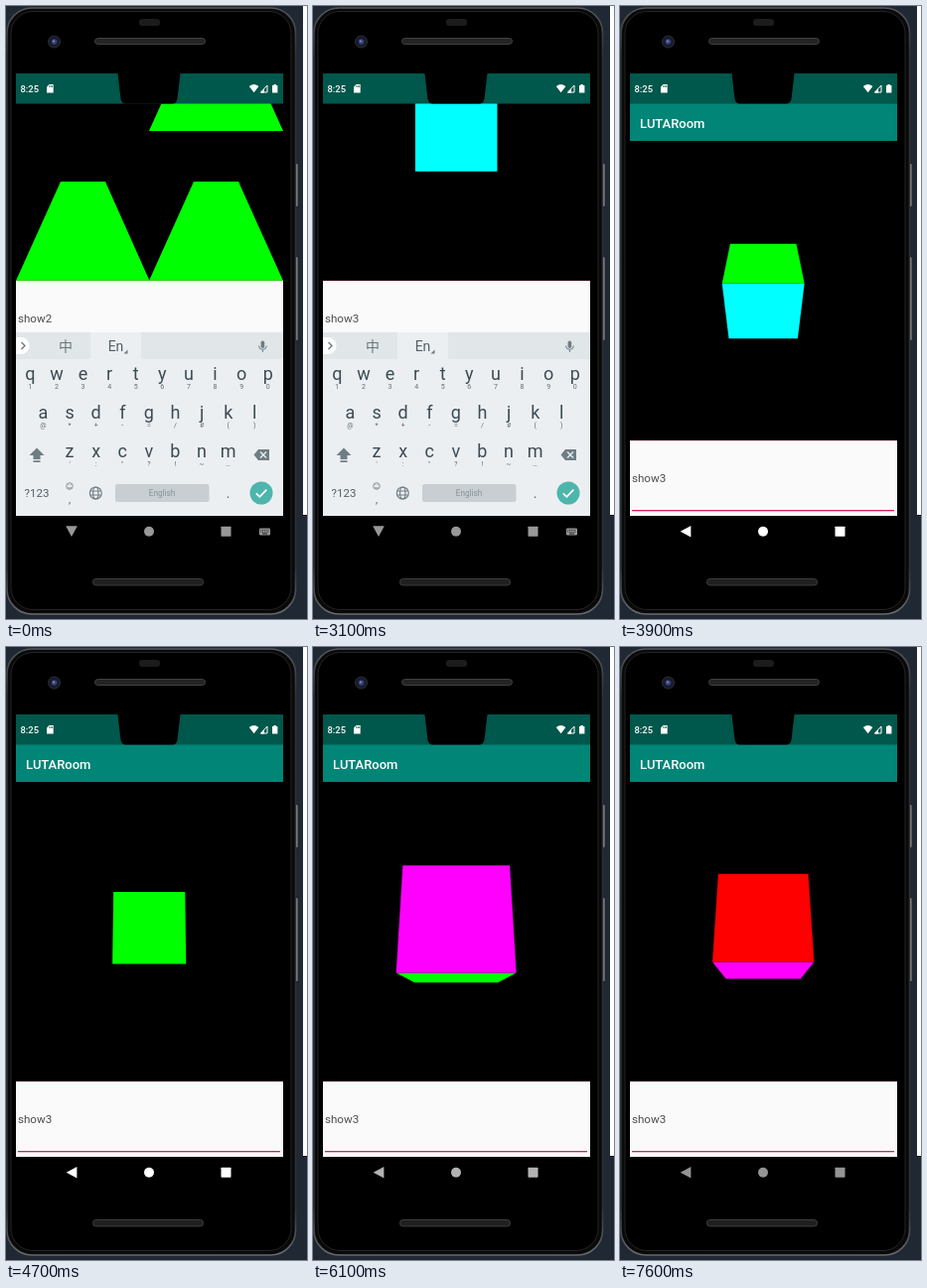
Write an HTML page that moves like this. It is 303 by 618 pixels and loops after 7.7 s.

```html
<!DOCTYPE html>
<html lang="en">
<head>
<meta charset="utf-8">
<title>Phone cube demo</title>
<style>
  html, body { margin: 0; width: 100%; height: 100%; overflow: hidden; background: #202833; }
  svg { display: block; width: 303px; height: 618px; font-family: Roboto, "Noto Sans", sans-serif; }
  .mid { text-anchor: middle; }
  .key { font-size: 18px; fill: #3c4b53; }
  .sub { font-size: 7px; fill: #5d6b73; }
  .icon { fill: #6f7d85; }
  .line { fill: none; stroke: #6f7d85; }
</style>
</head>
<body>
<svg viewBox="0 0 303 618">
  <defs>
    <clipPath id="appClip"><rect x="10" y="98" width="269" height="416"/></clipPath>
    <clipPath id="glClip"><rect x="10" y="136" width="269" height="302"/></clipPath>
    <linearGradient id="rim" x2="0" y2="1">
      <stop offset="0" stop-color="#55585b"/>
      <stop offset=".08" stop-color="#2d2f31"/>
      <stop offset=".92" stop-color="#2d2f31"/>
      <stop offset="1" stop-color="#66696c"/>
    </linearGradient>
    <linearGradient id="button">
      <stop offset="0" stop-color="#333"/>
      <stop offset=".6" stop-color="#999"/>
      <stop offset="1" stop-color="#444"/>
    </linearGradient>
  </defs>

  <!-- desktop and phone body -->
  <rect width="303" height="618" fill="#202833"/>
  <rect x="299" width="4" height="513" fill="#fff"/>
  <rect x="299" y="513" width="4" height="1" fill="#000"/>
  <rect x="290" y="159" width="4" height="43" rx="1.5" fill="url(#button)"/>
  <rect x="290" y="253" width="4" height="84" rx="1.5" fill="url(#button)"/>
  <rect x="1" y="2" width="290.5" height="611" rx="25" fill="#090909" stroke="url(#rim)" stroke-width="1.6"/>
  <rect x="5" y="5.5" width="282" height="603" rx="22" fill="#000" stroke="#242424"/>
  <rect x="134" y="13" width="21" height="7" rx="3" fill="#1c1c1c"/>
  <rect x="89.5" y="32.5" width="111" height="6" rx="3" fill="#242424" stroke="#414141"/>
  <rect x="87.5" y="577.5" width="111" height="6.5" rx="3" fill="#202020" stroke="#3d3d3d"/>
  <circle cx="48.5" cy="36" r="6" fill="#181b26" stroke="#2b2e38"/>
  <circle cx="48.5" cy="36" r="2.8" fill="#35427f"/>
  <circle cx="48" cy="35.5" r="1" fill="#8590cf"/>

  <!-- app window -->
  <g clip-path="url(#appClip)">
    <rect x="10" y="98" width="269" height="416" fill="#fafafa"/>
    <g id="app">
      <rect x="10" y="98" width="269" height="38" fill="#008577"/>
      <text x="20" y="122.5" font-size="13" font-weight="500" fill="#fff">LUTARoom</text>
      <rect x="10" y="136" width="269" height="302" fill="#000"/>
      <g clip-path="url(#glClip)">
        <path id="quads" fill="#0f0" d="M55 338H100L144.5 438H10ZM189 338H234L279 438H144ZM189 187H234L279 287H144Z"/>
        <g id="cube"></g>
      </g>
      <rect x="10" y="437.4" width="269" height="1" fill="#d81b60" opacity=".3"/>
      <text id="typed" x="12" y="480" font-size="11.6" fill="#4c4c4c"></text>
      <rect id="caret" y="468" width="1.3" height="16" fill="#d81b60"/>
      <rect x="12" y="508" width="264" height="1.3" fill="#d81b60"/>
    </g>
    <g id="board">
      <rect x="10" y="329" width="269" height="185" fill="#eceff1"/>
      <path fill="#e1e6e8" d="M10 329H85V356H10ZM136 329H279V356H136Z"/>
      <path fill="#fff" d="M10 334H15A8.5 8.5 0 0 1 15 351H10Z"/>
      <path class="line" stroke-width="1.4" d="M15.5 339L19 342.5L15.5 346"/>
      <text class="mid" x="60" y="348" font-size="14" fill="#6a777e" style="font-family:'Noto Sans CJK SC','Noto Sans CJK',sans-serif">中</text>
      <text class="mid" x="110.5" y="348" font-size="14" fill="#526067">En</text>
      <path class="icon" d="M122.5 346.5V350.5H118.5Z"/>
      <rect class="icon" x="256.6" y="337.5" width="3.6" height="7.5" rx="1.8"/>
      <path class="line" d="M254.5 342.5a3.9 3.9 0 0 0 7.8 0M258.4 346.5V349"/>
      <g id="keys"></g>
      <path class="icon" d="M31 445.5L38.5 453H34.5V457H27.5V453H23.5ZM27.5 458.2H34.5V460H27.5Z"/>
      <path class="icon" d="M249.5 452.5L254 447H265V458H254Z"/>
      <path fill="none" stroke="#eceff1" stroke-width="1.3" d="M256 449.5L262 455.5M262 449.5L256 455.5"/>
      <text class="mid" x="31" y="495" font-size="11.5" fill="#526067">?123</text>
      <circle class="line" cx="64" cy="484" r="3.3" stroke-width=".8"/>
      <path class="line" stroke-width=".8" d="M62.2 485a2 2 0 0 0 3.6 0M62.8 482.3V483.2M65.2 482.3V483.2"/>
      <text class="mid" x="64" y="501" font-size="11" fill="#526067">,</text>
      <g class="line" stroke-width="1.1">
        <circle cx="90.3" cy="491" r="6"/>
        <ellipse cx="90.3" cy="491" rx="2.7" ry="6"/>
        <path d="M84.8 489H95.8M84.8 493H95.8"/>
      </g>
      <rect x="110" y="482" width="94.5" height="18" rx="2.5" fill="#c8ced1"/>
      <text class="mid" x="157" y="494" font-size="8.2" fill="#87939a">English</text>
      <text class="mid" x="223.5" y="496" font-size="14" fill="#526067">.</text>
      <circle id="enter" cx="257" cy="491" r="11.5"/>
      <path fill="none" stroke="#fff" stroke-width="1.7" d="M251.8 491.3L255.4 494.8L262.3 487.6"/>
    </g>
    <path id="handle" fill="#d81b60" d="M47.2 323.5L52.2 328.3A7 7 0 1 1 42.2 328.3Z"/>
  </g>

  <!-- status bar -->
  <rect x="10" y="68" width="269" height="30.5" fill="#00574b"/>
  <path d="M112.5 68H175.5L172.6 93Q172 98.5 167 98.5H121Q116 98.5 115.4 93Z" fill="#000"/>
  <text x="14.5" y="86.7" font-size="9.4" font-weight="500" fill="#fff">8:25</text>
  <path fill="#fff" d="M43.5 79H47.7V87.5H41V81.5Z"/>
  <path stroke="#00574b" stroke-width=".7" d="M43.8 80V82M45.2 80V82M46.6 80V82"/>
  <path fill="#fff" d="M244.8 81Q249.6 77 254.4 81L249.6 87.3ZM268 80H269.4V79H272V80H273.4V87.5H268Z"/>
  <path fill="none" stroke="#fff" d="M263 80V87H256.5Z"/>
  <path fill="#fff" d="M260 83.3V87.4H256Z"/>

  <!-- navigation bar -->
  <g id="nav">
    <path id="back" d="M60.2 524.3H71.8L66 535Z"/>
    <circle cx="144" cy="529.7" r="5"/>
    <rect x="216.5" y="524.7" width="10" height="10" rx=".6"/>
    <g id="switcher">
      <rect x="255" y="526.5" width="11" height="7" rx="1"/>
      <path stroke="#000" stroke-width=".8" stroke-dasharray="1 .8" d="M256.2 528.3H265M256.2 530.2H265"/>
      <path stroke="#000" stroke-width=".8" d="M258 532H263"/>
    </g>
  </g>
</svg>
<script>
const LOOP = 7700, STEP = 100;
const PAN = 161;
const CENTER = { x: 144.2, y: 286.5 };
const FOCAL = 264;
const COLORS = ['#0ff', '#0f0', '#f0f', '#f00'];
const CARET_ON = [[200, 700], [1100, 2100], [2600, 3100], [4200, 4700],
                  [5300, 5700], [6200, 6600], [7100, 7600]];

const $ = id => document.getElementById(id);
const clamp = (v, lo, hi) => Math.min(hi, Math.max(lo, v));
const ramp = (t, from, to) => clamp((t - from) / (to - from), 0, 1);
const show = (id, on) => $(id).setAttribute('visibility', on ? 'inherit' : 'hidden');
const set = (id, name, value) => $(id).setAttribute(name, value);

function make(tag, parent, attrs, text = '') {
  const el = document.createElementNS(parent.namespaceURI, tag);
  for (const name in attrs) el.setAttribute(name, attrs[name]);
  el.textContent = text;
  return parent.appendChild(el);
}

function addRow(letters, hints, x0, y) {
  [...letters].forEach((letter, i) => {
    const x = x0 + i * 26.6;
    make('text', $('keys'), { class: 'key mid', x, y }, letter);
    make('text', $('keys'), { class: 'sub mid', x, y: y + 9 }, hints[i]);
  });
}
addRow('qwertyuiop', '1234567890', 24.3, 377);
addRow('asdfghjkl', '@*+-=/#()', 37.5, 416);
addRow('zxcvbnm', '\':"?!~…', 64, 454.5);

const faces = COLORS.map(fill => make('polygon', $('cube'), { fill }));

// The cube turns one radian per second while it drifts away from the eye.
function drawCube(t) {
  const s = (t - 3100 - clamp(t - 3300, 0, 130)) / 1000;
  const dist = (t < 4800 ? 3.7 : 1.995) + 0.28 * s;
  const edge = angle => {
    const up = Math.SQRT1_2 * Math.sin(angle);
    const depth = dist - Math.SQRT1_2 * Math.cos(angle);
    return { y: CENTER.y - FOCAL * up / depth, half: FOCAL / 2 / depth };
  };
  faces.forEach((face, i) => {
    const normal = i * Math.PI / 2 - s;
    const a = edge(normal + Math.PI / 4), b = edge(normal - Math.PI / 4);
    const { x } = CENTER;
    face.setAttribute('points',
      [x - a.half, a.y, x + a.half, a.y, x + b.half, b.y, x - b.half, b.y].map(v => v.toFixed(2)).join(' '));
    face.setAttribute('visibility', a.y < b.y ? 'inherit' : 'hidden');
  });
}

function draw(t) {
  const word = t < 1100 ? 'show2' : t < 1600 ? 'show' : 'show3';
  $('typed').textContent = word;
  set('caret', 'x', word.length === 4 ? 39.8 : 46.2);
  show('caret', CARET_ON.some(([from, to]) => t >= from && t < to));
  show('handle', t >= 600 && t < 1200);

  const cubeOn = t >= 2500;
  show('quads', !cubeOn);
  show('cube', cubeOn);
  if (cubeOn) drawCube(t);
  else faces.forEach(f => f.setAttribute('visibility', 'hidden'));

  const pressed = t === 2400;
  set('enter', 'fill', pressed ? '#3b9a91' : '#4db6ac');

  const slide = 1 - (1 - ramp(t, 3300, 3700)) ** 2;
  set('app', 'transform', `translate(0 ${-PAN * (1 - slide)})`);
  const away = ramp(t, 3200, 3500);
  set('board', 'transform', `translate(0 ${185 * away * away})`);
  set('board', 'opacity', 1 - away);

  const lit = ramp(t, 3200, 3400), dim = ramp(t, 5900, 6300);
  const grey = Math.round(t < 5000 ? 152 + 103 * lit : 255 - 107 * (1 - (1 - dim) ** 1.8));
  set('nav', 'fill', `rgb(${grey},${grey},${grey})`);
  set('back', 'transform', `rotate(${90 * ramp(t, 3200, 3500)} 66 529.7)`);
  show('switcher', t < 3400);
}

const start = performance.now();
function tick() {
  const t = (performance.now() - start) % LOOP;
  draw(Math.floor(t / STEP) * STEP);
  requestAnimationFrame(tick);
}
tick();
</script>
</body>
</html>
```
